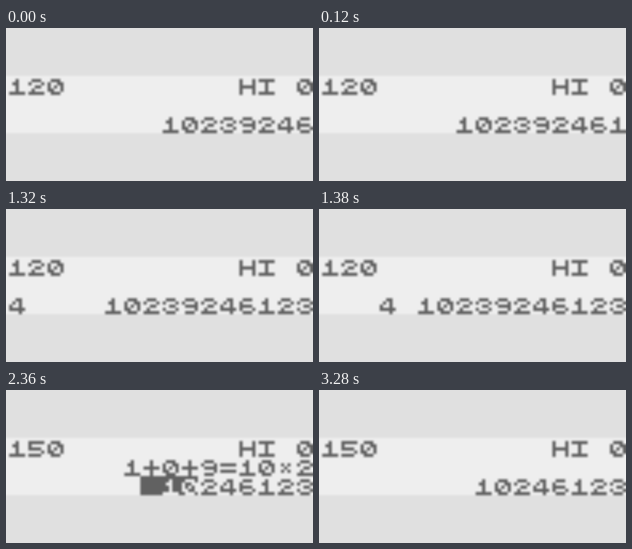
These frames come from a looping animation (384 px wide and 192 px high, 3600 ms). An HTML page with a canvas:

```html
<!DOCTYPE html>
<html lang="en">
<head>
<meta charset="utf-8">
<title>Number game</title>
<style>
  html, body { margin: 0; width: 100%; height: 100%; overflow: hidden; background: #e0e0e0; }
  canvas { display: block; width: 384px; height: 192px; }
</style>
</head>
<body>
<canvas id="stage" width="384" height="192" role="img" aria-label="Number game: score and a row of digits"></canvas>
<script>
const LOOP = 3600, SCALE = 4, CELL = 6, COLS = 16, TOP = 15;
const PAGE = '#e0e0e0', LIGHT = '#eeeeee', DARK = '#616161';

// 5x5 glyphs, rows separated by slashes
const GLYPHS = {
  0: ' lll /l  ll/l l l/ll  l/ lll ',
  1: '  l  / ll  /  l  /  l  /lllll',
  2: ' lll /l   l/  ll / l   /lllll',
  3: ' lll /l   l/  ll /l   l/ lll ',
  4: '  ll / l l /l  l /lllll/   l ',
  5: 'lllll/l    /llll /    l/llll ',
  6: ' lll /l    /llll /l   l/ lll ',
  9: ' lll /l   l/ llll/    l/ lll ',
  H: 'l   l/l   l/lllll/l   l/l   l',
  I: 'lllll/  l  /  l  /  l  /lllll',
  '+': '  l  /  l  /lllll/  l  /  l  ',
  '=': '     /lllll/     /lllll/     ',
  x: '     / l l /  l  / l l /     '
};

const SHOT = 1320, STEP = 20;

// hit: [first column, column count] of the cleared block; its last two cells hold the sum
const SCENES = [
  { at: 0, score: '120', row: '10239246' },
  { at: 120, score: '120', row: '102392461' },
  { at: 1060, score: '120', row: '1023924612' },
  { at: SHOT, score: '120', row: '10239246123', shot: '4' },
  { at: 1420, score: '130', row: '109246123', sum: '4+1+0+2+3=10', hit: [4, 5] },
  { at: 2360, score: '150', row: '10246123', sum: '1+0+9=10x2', hit: [7, 3] },
  { at: 3280, score: '150', row: '10246123' }
];

const stage = document.getElementById('stage').getContext('2d');
const small = document.createElement('canvas');
small.width = 96;
small.height = 48;
const g = small.getContext('2d');

function box(x, y, w, h, color) {
  g.fillStyle = color;
  g.fillRect(x, y, w, h);
}

function write(text, col, line, color = DARK) {
  [...text].forEach((ch, i) => {
    if (ch === ' ') return;
    const x = (col + i) * CELL + 1, y = TOP + line * CELL + 1;
    GLYPHS[ch].split('/').forEach((dots, r) => {
      [...dots].forEach((dot, c) => {
        if (dot === 'l') box(x + c, y + r, 1, 1, color);
      });
    });
  });
}

const writeRight = (text, line) => write(text, COLS - text.length, line);

function draw(time) {
  const t = time % LOOP;
  const scene = SCENES.findLast(s => s.at <= t);

  box(0, 0, 96, 48, PAGE);
  box(0, TOP, 96, 3 * CELL, LIGHT);
  write(scene.score, 0, 0);
  writeRight('HI 0', 0);
  if (scene.sum) writeRight(scene.sum, 1);

  if (scene.hit) {
    const [col, count] = scene.hit;
    box(col * CELL, TOP + 2 * CELL, count * CELL, CELL, DARK);
    write(scene.row.slice(0, 2), col + count - 2, 2, LIGHT);
    writeRight(scene.row.slice(2), 2);
  } else {
    writeRight(scene.row, 2);
  }
  if (scene.shot) write(scene.shot, Math.floor((t - SHOT) / STEP), 2);

  // smooth enlargement gives the soft pixel edges
  stage.imageSmoothingEnabled = true;
  stage.drawImage(small, 0, 0, 96 * SCALE, 48 * SCALE);
}

function tick() {
  draw(performance.now() - start);
  requestAnimationFrame(tick);
}

const start = performance.now();
tick();
</script>
</body>
</html>
```
